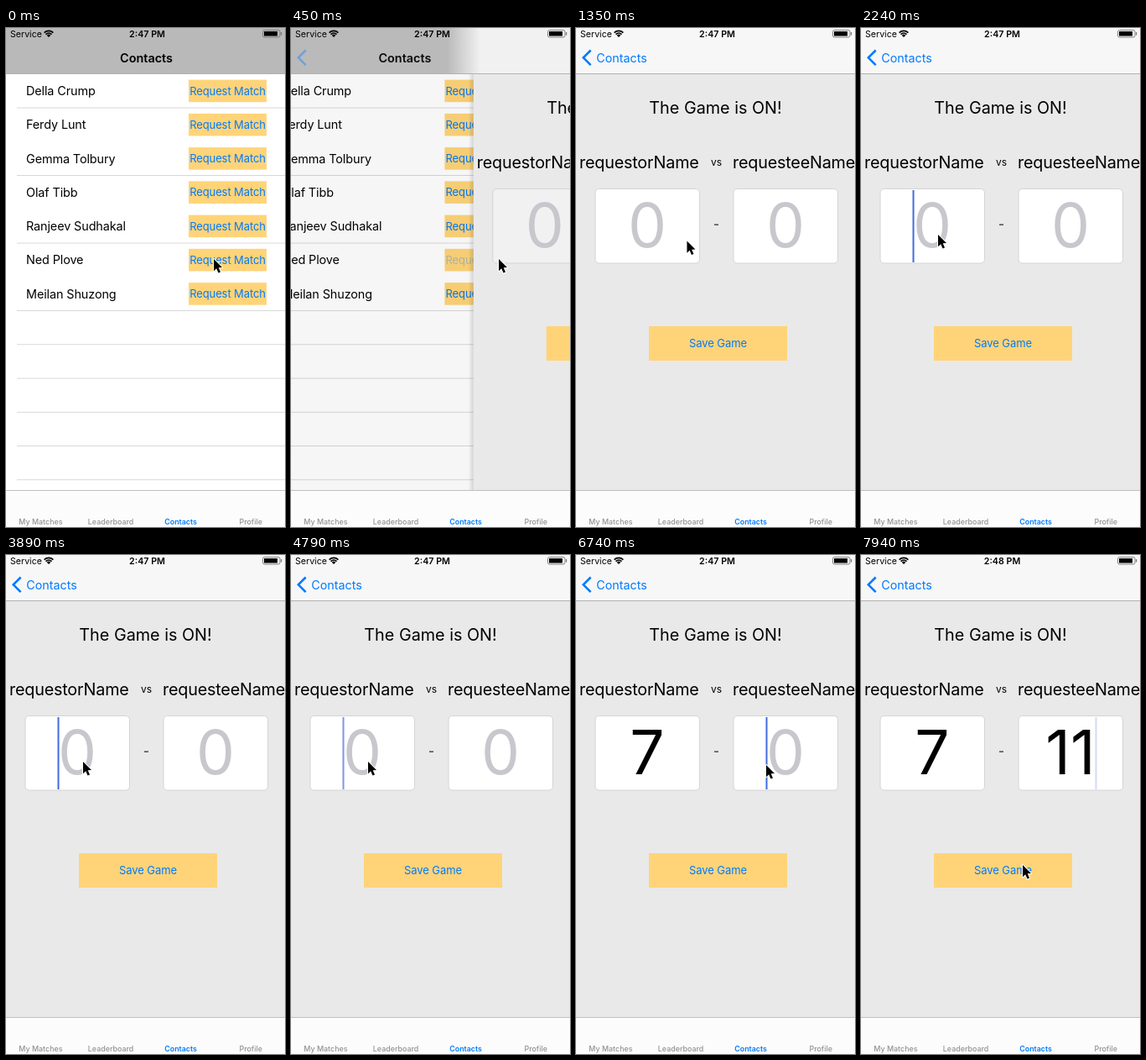
Write an HTML page with a canvas that moves like this. It is 333x594 px and loops after 8000 ms.

```html
<!DOCTYPE html>
<html lang="en">
<head>
<meta charset="utf-8">
<title>Contacts</title>
<style>
  html, body { margin: 0; width: 100%; height: 100%; overflow: hidden; background: #fff; }
  canvas { display: block; width: 333px; height: 594px; }
</style>
</head>
<body>
<canvas id="stage"></canvas>
<script>
const W = 333, H = 594, LOOP = 8000, TICK = 150, BAR = 54, TABS = 550, ROW = 40.25;
const BLUE = '#007aff', AMBER = '#ffd479';
const TAP = 300, FOCUS_A = 1950, TYPE_A = 6150, FOCUS_B = 6600, KEY_GAP = 450, MINUTE = 7350;

const canvas = document.getElementById('stage');
const ctx = canvas.getContext('2d');
const scale = window.devicePixelRatio || 1;
canvas.width = Math.round(W * scale);
canvas.height = Math.round(H * scale);

const people = ['Della Crump', 'Ferdy Lunt', 'Gemma Tolbury', 'Olaf Tibb',
  'Ranjeev Sudhakal', 'Ned Plove', 'Meilan Shuzong'];
const PRESSED = 5;

const clamp = (v, lo = 0, hi = 1) => Math.max(lo, Math.min(hi, v));
const mix = (a, b, u) => a + (b - a) * u;

function ease(t, start, end) {
  const u = clamp((t - start) / (end - start));
  return u * u * (3 - 2 * u);
}

// Critically damped spring.
function pushProgress(t) {
  if (t >= 900) return 1;
  const w = Math.max(0, t - 386.6) * 0.0193;
  return 1 - (1 + w) * Math.exp(-w);
}

function pointerAt(t) {
  const toA = ease(t, 1050, 1500), toB = ease(t, 6150, 6600), toSave = ease(t, 7200, 7800);
  return [
    mix(mix(mix(248, 92, toA), 227, toB), 193, toSave),
    mix(mix(mix(275, 246, toA), 250, toB), 369, toSave)
  ];
}

// One-second blink with soft edges, restarted by each tap or key.
function blink(age) {
  const u = (age % 1000) / 1000;
  return clamp((Math.abs(u - .615) - .13) / .15);
}

function inputAt(t) {
  const keys = clamp(Math.floor((t - FOCUS_B) / KEY_GAP), 0, 2);
  const since = t < TYPE_A ? FOCUS_A : t < FOCUS_B ? TYPE_A : FOCUS_B + keys * KEY_GAP;
  return {
    a: t < TYPE_A ? '' : '7',
    b: '11'.slice(0, keys),
    focus: t < FOCUS_A ? '' : t < FOCUS_B ? 'a' : 'b',
    caret: blink(t - since)
  };
}

function rect(x, y, w, h, color) {
  ctx.fillStyle = color;
  ctx.fillRect(x, y, w, h);
}

function text(str, x, y, size, color, { align = 'left', weight = 400, track = 0 } = {}) {
  ctx.font = `${weight} ${size}px Inter, Roboto, sans-serif`;
  ctx.letterSpacing = track + 'px';
  ctx.textAlign = align;
  ctx.fillStyle = color;
  ctx.fillText(str, x, y);
}

function faded(alpha, draw) {
  ctx.save();
  ctx.globalAlpha *= clamp(alpha);
  draw();
  ctx.restore();
}

function button(label, x, y, w, h, color = BLUE) {
  rect(x, y, w, h, AMBER);
  text(label, x + w / 2, y + h / 2 + 4.8, 13, color, { align: 'center', track: -.1 });
}

function drawList(t) {
  rect(0, BAR, W, TABS - BAR, '#fff');
  for (let i = 1; i <= 12; i++) {
    const hidden = i < people.length && i % 2 === 0;
    if (!hidden) rect(13, BAR + .4 + i * ROW, W, .8, '#cfced2');
  }
  people.forEach((name, i) => {
    const y = 75 + i * ROW;
    text(name, 24, y + 5, 14.4, '#000', { track: -.1 });
    const down = i === PRESSED && t >= TAP;
    button('Request Match', 218, y - 13.4, 93, 26.6, down ? 'rgba(0,122,255,.3)' : BLUE);
  });
}

function field(x, score, focused, caret, p) {
  const mid = x + 62.5;
  ctx.beginPath();
  ctx.roundRect(x + .5, 191.5, 124.5, 88.5, 4.5);
  ctx.fillStyle = `rgba(255,255,255,${p})`;
  ctx.fill();
  ctx.strokeStyle = '#d4d4d4';
  ctx.lineWidth = 1;
  ctx.stroke();
  text(score || '0', mid, 261, 73, score ? '#000' : '#c7c7cd', { align: 'center' });
  if (!focused) return;
  const half = ctx.measureText(score || '0').width / 2;
  const cx = Math.round(mid + (score ? half : -half));
  faded(caret, () => rect(cx - .5, 193, 2, 86, '#426be0'));
}

function drawGame(t, p) {
  const { a, b, focus, caret } = inputAt(t);
  rect(0, BAR, W, TABS - BAR, '#e9e9e9');
  text('The Game is ON!', 166.5, 102, 19.8, '#000', { align: 'center' });
  text('requestorName', 75.3, 167, 19.8, '#000', { align: 'center', track: -.2 });
  text('requesteeName', 187, 167, 19.8, '#000', { track: -.2 });
  text('vs', 167.5, 164, 12, '#000', { align: 'center' });
  rect(165, 233.5, 5, 1.2, '#222');
  field(22.5, a, focus === 'a', caret, p);
  field(187.5, b, focus === 'b', caret, p);
  button('Save Game', 87, 355, 165, 41);
}

function drawPages(t, p) {
  const x = W * (1 - p);
  ctx.save();
  ctx.beginPath();
  ctx.rect(0, BAR, W, TABS - BAR);
  ctx.clip();
  if (p < 1) {
    ctx.save();
    ctx.translate(-100 * p, 0);
    drawList(t);
    ctx.restore();
    rect(0, BAR, W, TABS - BAR, `rgba(0,0,0,${.1 * p})`);
    const shade = ctx.createLinearGradient(x - 6, 0, x, 0);
    shade.addColorStop(0, 'rgba(0,0,0,0)');
    shade.addColorStop(1, `rgba(0,0,0,${.16 * (1 - p * p)})`);
    if (p > 0) rect(x - 6, BAR, 6, TABS - BAR, shade);
  }
  ctx.translate(x, 0);
  drawGame(t, p);
  ctx.restore();
}

function drawWifi() {
  const wedge = r => {
    ctx.beginPath();
    ctx.arc(51, 11, r, -Math.PI * .75, -Math.PI * .25);
  };
  ctx.strokeStyle = ctx.fillStyle = '#000';
  ctx.lineWidth = 1.7;
  for (const r of [7.6, 4.9]) {
    wedge(r);
    ctx.stroke();
  }
  wedge(3.2);
  ctx.lineTo(51, 11);
  ctx.fill();
}

function drawBattery() {
  ctx.beginPath();
  ctx.roundRect(306.5, 2.5, 20.5, 8.5, 2);
  ctx.strokeStyle = '#777';
  ctx.lineWidth = .9;
  ctx.stroke();
  rect(308, 4, 16, 5.5, '#000');
  rect(328, 5, 1.2, 3.5, '#777');
}

function drawChevron() {
  ctx.beginPath();
  ctx.moveTo(17.6, 26.5);
  ctx.lineTo(8.8, 35.3);
  ctx.lineTo(17.6, 44.1);
  ctx.strokeStyle = BLUE;
  ctx.lineWidth = 2.6;
  ctx.stroke();
}

function drawNav(t, p) {
  const edge = W * (1 - p) + 40 * (1 - Math.sqrt(p));
  rect(0, 0, W, BAR, '#f7f7f7');
  const tint = ctx.createLinearGradient(edge - 48, 0, edge - 8, 0);
  tint.addColorStop(0, '#b9b9b9');
  tint.addColorStop(1, '#f1f1f1');
  faded(1 - p ** 4, () => rect(0, 0, W, BAR, p > 0 ? tint : '#b9b9b9'));
  rect(0, BAR, W, 1, '#b2b2b2');

  text('Service', 5, 10.5, 10.6, '#000');
  drawWifi();
  text(t < MINUTE ? '2:47 PM' : '2:48 PM', 168.5, 10.5, 10.7, '#000', { align: 'center', weight: 600 });
  drawBattery();

  const middle = mix(167.5, 54.5, p ** 1.2);
  faded(1 - (p / .9) ** 3, () =>
    text('Contacts', middle, 40.5, 14.4, '#000', { align: 'center', weight: 600 }));
  faded((p - .5) * 2.1, () =>
    text('Contacts', middle, 40.5, 14.3, BLUE, { align: 'center' }));
  faded(p * 1.1, drawChevron);
}

function drawTabs() {
  rect(0, TABS, W, H - TABS, '#fcfcfc');
  rect(0, TABS, W, 1, '#bfbfbf');
  ['My Matches', 'Leaderboard', 'Contacts', 'Profile'].forEach((label, i) => {
    const active = label === 'Contacts';
    text(label, 41.4 + i * 83.6, 591.3, 8.9, active ? BLUE : '#929292',
      { align: 'center', weight: active ? 600 : 500 });
  });
}

const arrow = new Path2D('M0 0V14.2L3.2 11.2L5.5 16.6L8 15.5L5.7 10.3L10 10.1Z');

function drawPointer([x, y]) {
  ctx.save();
  ctx.translate(x, y);
  ctx.lineJoin = 'round';
  ctx.strokeStyle = '#fff';
  ctx.lineWidth = 2;
  ctx.stroke(arrow);
  ctx.fillStyle = '#000';
  ctx.fill(arrow);
  ctx.restore();
}

function frame(now) {
  // The screen refreshes in ticks, a hair early on each.
  const t = Math.floor((now % LOOP + 12) / TICK) * TICK;
  const p = pushProgress(t);
  ctx.setTransform(scale, 0, 0, scale, 0, 0);
  drawPages(t, p);
  drawNav(t, p);
  drawTabs();
  drawPointer(pointerAt(t));
  requestAnimationFrame(frame);
}
requestAnimationFrame(frame);
</script>
</body>
</html>
```
